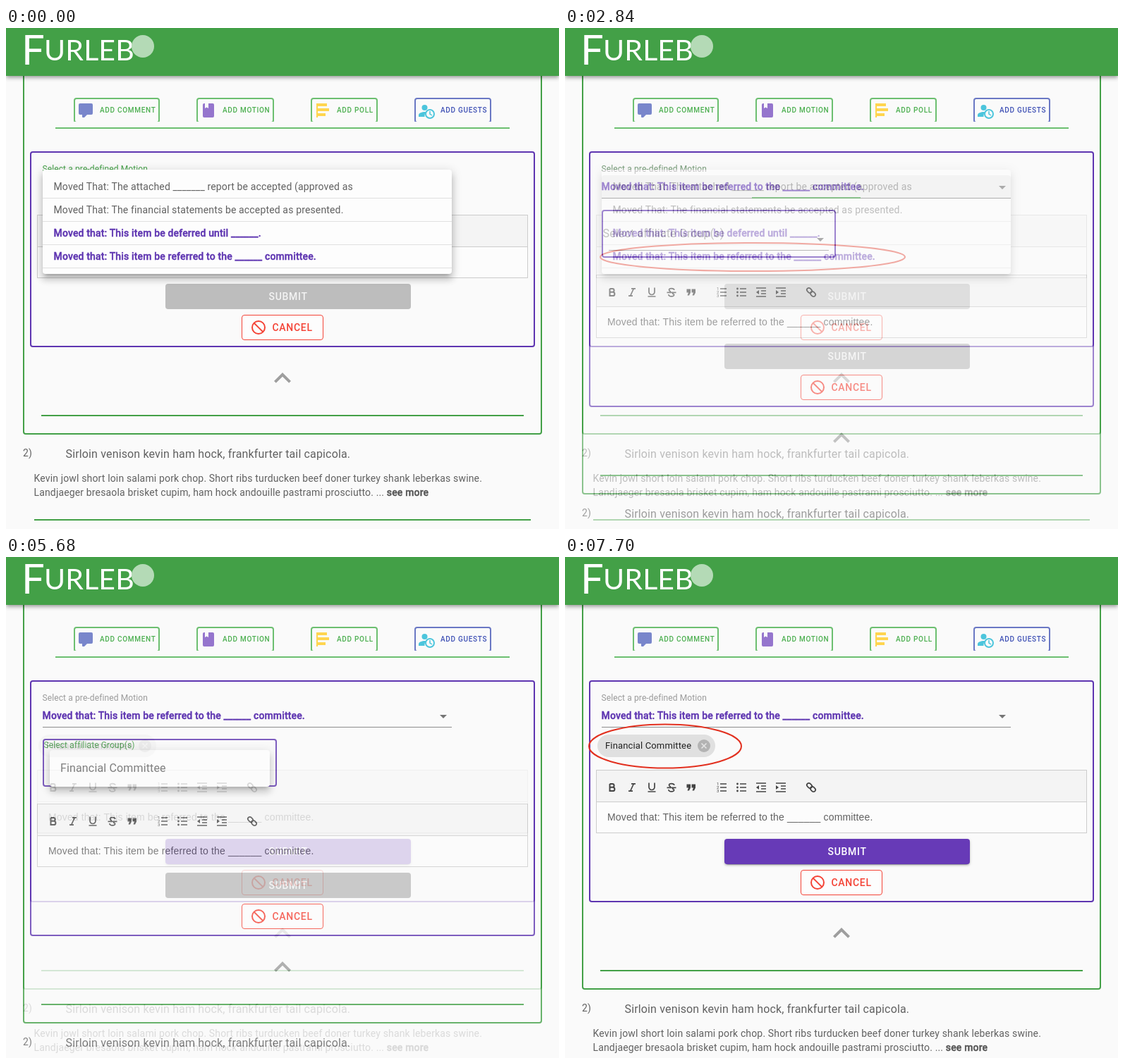
An HTML page that plays this animation: 784 px wide and 711 px high, repeating every 9.7 s.

```html
<!DOCTYPE html>
<html lang="en">
<head>
<meta charset="utf-8">
<title>Pre-defined motion form</title>
<style>
  html, body { margin: 0; width: 100%; height: 100%; overflow: hidden; background: #fafafa; }
  svg { display: block; width: 784px; height: 711px; }
  text { font: 14px Roboto, sans-serif; letter-spacing: .15px; fill: #616161; white-space: pre; }
  .bold { font-weight: 500; stroke: currentColor; stroke-width: .4px; fill: currentColor; }
  .button { font-weight: 500; letter-spacing: .7px; }
  .label { font-size: 12px; letter-spacing: .1125px; }
</style>
</head>
<body>
<svg id="stage" viewBox="0 0 784 711"></svg>
<script>
const GREEN = '#43a047', LIGHT_GREEN = '#6cbf70', PURPLE = '#5e35b1', RED = '#f44336', GRAY = '#9a9a9a', PAGE = '#fafafa';

const text = (x, y, s, attrs = '') => `<text x="${x}" y="${y}" ${attrs}>${s}</text>`;
const rect = (x, y, w, h, fill, r = 0, attrs = '') =>
  `<rect x="${x}" y="${y}" width="${w}" height="${h}" rx="${r}" fill="${fill}" ${attrs}/>`;
const frame = (x, y, w, h, color, width = 2, r = 3, fill = 'none') =>
  rect(x, y, w, h, fill, r, `stroke="${color}" stroke-width="${width}"`);
const path = (d, fill, attrs = '') => `<path d="${d}" fill="${fill}" ${attrs}/>`;
const line = (d, color, width = 2) => path(d, 'none', `stroke="${color}" stroke-width="${width}"`);
const circle = (x, y, r, fill, attrs = '') => `<circle cx="${x}" cy="${y}" r="${r}" fill="${fill}" ${attrs}/>`;
const group = (x, y, content, more = '') => `<g transform="translate(${x} ${y}) ${more}">${content}</g>`;
const ring = (x, y, rx, ry) =>
  `<ellipse cx="${x}" cy="${y}" rx="${rx}" ry="${ry}" fill="none" stroke="#e2301f" stroke-width="2"/>`;
const arrow = (x, y) => path(`M${x - 5} ${y}h10l-5 5z`, '#757575');

// Each shadow: [offset y, blur, spread, alpha]
const raised = (x, y, w, h, shadows, fill, r) => shadows.map(([dy, blur, spread, alpha]) =>
  rect(x - spread, y - spread + dy, w + 2 * spread, h + 2 * spread, '#000', r,
    `opacity="${alpha}" style="filter:blur(${blur / 2}px)"`)).join('') + rect(x, y, w, h, fill, r);
const MENU_SHADOW = [[5, 5, -3, .2], [8, 10, 1, .14], [3, 14, 2, .12]];
const BAR_SHADOW = [[2, 4, -1, .2], [4, 5, 0, .14], [1, 10, 0, .12]];
const BUTTON_SHADOW = [[3, 1, -2, .2], [2, 2, 0, .14], [1, 5, 0, .12]];

function header() {
  return raised(0, 0, 784, 68, BAR_SHADOW, GREEN, 0) +
    text(22, 52, 'F', 'style="font:58px Lato,sans-serif;fill:#fff"') +
    text(54, 46, 'URLEB', 'style="font:41px Lato,sans-serif;fill:#fff"') +
    circle(194, 26, 16, '#b4dab6');
}

function actions() {
  const button = (x, w, labelX, label, border, color) =>
    frame(x + 1, 100, w - 2, 34, border) + rect(x - 1, 133, w + 2, 4, PAGE) +
    text(labelX, 120, label, `class="button" style="font-size:10px;fill:${color}"`);
  const cyan = '#4cc5dc';
  return button(96, 122, 133, 'ADD COMMENT', LIGHT_GREEN, '#4caf50') +
    button(270, 110, 307, 'ADD MOTION', LIGHT_GREEN, '#4caf50') +
    button(432, 95, 469, 'ADD POLL', LIGHT_GREEN, '#4caf50') +
    button(579, 109, 616, 'ADD GUESTS', '#6a78c4', '#3f51b5') +
    path('M109 127a1 1 0 01-1-1v-3h-3a2 2 0 01-2-2v-12a2 2 0 012-2h16a2 2 0 012 2v12a2 2 0 01-2 2h-6l-4 4z', '#7986cb') +
    path('M293 127a2 2 0 002-2v-16a2 2 0 00-2-2h-6v7l-2.500-1.500-2.500 1.500v-7h-1a2 2 0 00-2 2v16a2 2 0 002 2z', '#9575cd') +
    path('M440 107h15v4h-13v3h16v4h-16v3h11v4h-11v2h-2z', '#ffd54f') +
    circle(593.5, 113, 4, cyan) +
    path('M585 126v-2.500c0-3 5-4.500 9-4.500l2 .2a8 8 0 00-2.500 6.800z', cyan) +
    circle(601, 122, 6, PAGE, `stroke="${cyan}" stroke-width="2"`) + line('M601 118v4l3 2', cyan, 1.5) +
    line('M70 142H714', LIGHT_GREEN);
}

function toolbarIcons() {
  const ink = '#444';
  const stroke = d => line(d, ink, 1.7);
  const rows = 'M-2-5h9M-2 0h9M-2 5h9', margins = 'M-7-6h14M0-2h7M0 2h7M-7 6h14';
  const digits = [1, 2, 3].map((n, i) => text(-7, i * 5 - 3, n, `style="font-size:6px;fill:${ink}"`)).join('');
  const link = '<g transform="rotate(45)">' + frame(-7.5, -2.8, 8, 5.6, ink, 1.7, 2.8) +
    frame(-.5, -2.8, 8, 5.6, ink, 1.7, 2.8) + '</g>';
  const icons = [
    [67, line('M-3.500-5v10h4.300a2.600 2.600 0 000-5.200h-4.300M.2-.2a2.400 2.400 0 000-4.800h-3.700', ink, 2)],
    [95, stroke('M-1-5.200h6M-5 5.200h6M2.300-5l-4.600 10')],
    [123, stroke('M-4-6.500v6a4 4 0 008 0v-6M-5.500 6h11')],
    [151, stroke('M-6.500.3h13M4-3.200c-.6-3-7.500-3-7.500 0q0 1.500 2.500 2.400M1 1.800c4 .8 3.200 4-1 4-2.500 0-4-1-4.300-2.700')],
    [179, path('M-6.500-4.500h5.500v5l-2 4h-2.500l1.500-4h-2.500zM.5-4.500h5.500v5l-2 4h-2.500l1.500-4h-2.500z', ink)],
    [222, stroke(rows) + digits],
    [250, stroke(rows) + [-5, 0, 5].map(y => circle(-5.5, y, 1.4, ink)).join('')],
    [278, stroke(margins) + path('M-7 0l4-3v6z', ink)],
    [306, stroke(margins) + path('M-3 0l-4-3v6z', ink)],
    [349, link]
  ];
  return icons.map(([x, icon]) => group(x, 290, icon)).join('');
}

function editor(filled) {
  return frame(44.5, 265.5, 695, 89, '#ccc', 1, 0, '#fcfcfc') +
    frame(44.5, 265.5, 695, 45, '#ccc', 1, 0, '#f4f4f4') + toolbarIcons() +
    (filled ? text(60, 337, 'Moved that: This item be referred to the ______ committee.',
      'style="font-family:Liberation Sans,Arial,sans-serif"') : '');
}

function formButtons(enabled) {
  return raised(226, 363, 348, 36, enabled ? BUTTON_SHADOW : [], enabled ? '#673ab7' : '#bdbdbd', 4) +
    text(372.5, 386, 'SUBMIT', `class="button" style="fill:${enabled ? '#fff' : '#f3f3f3'}"`) +
    frame(334.5, 407.5, 115, 35, RED, 1, 3.5, '#fdfdfd') +
    circle(358, 425, 9, 'none', `stroke="${RED}" stroke-width="2"`) + line('M351.600 418.600l12.800 12.800', RED) +
    text(377.5, 430, 'CANCEL', `class="button" style="fill:${RED}"`);
}

function agenda() {
  return path('M12 8l-6 6 1.410 1.410L12 10.830l4.590 4.580L18 14z', '#9e9e9e', 'transform="translate(368 473) scale(2)"') +
    line('M50 550H734M40 698H744', GREEN) +
    text(24, 608, '2)') +
    text(84.5, 610, 'Sirloin venison kevin ham hock, frankfurter tail capicola.', 'style="font-size:16px"') +
    text(39.5, 644, 'Kevin jowl short loin salami pork chop. Short ribs turducken beef doner turkey shank leberkas swine.') +
    text(39.5, 664, 'Landjaeger bresaola brisket cupim, ham hock andouille pastrami prosciutto. ... ' +
      '<tspan class="bold" style="color:#555">see more</tspan>');
}

const motionLabel = color => text(51.5, 204, 'Select a pre-defined Motion', `class="label" style="fill:${color}"`);

function motionMenu() {
  const items = ['Moved That: The attached _______ report be accepted (approved as',
    'Moved That: The financial statements be accepted as presented.',
    'Moved that: This item be deferred until ______.',
    'Moved that: This item be referred to the ______ committee.'];
  return motionLabel(GREEN) + raised(52, 201, 580, 148, MENU_SHADOW, '#fdfdfd', 4) +
    items.map((item, i) => text(67.5, 230 + 33 * i, item, i > 1 ? `class="bold" style="color:${PURPLE}"` : '') +
      line(`M52 ${241.5 + 33 * i}H632`, '#e0e0e0', 1)).join('');
}

function motionField(focused) {
  return (focused ? path('M52 241v-28q0-4 4-4h572q4 0 4 4v28z', '#eee') : '') +
    motionLabel(GRAY) +
    text(51.5, 230, 'Moved that: This item be referred to the ______ committee.', `class="bold" style="color:${PURPLE}"`) +
    line('M52 241.500H632', '#8c8c8c', 1) + (focused ? line('M265 241H419', GREEN) : '') + arrow(620, 224);
}

function groupField(open) {
  return frame(53, 259, 330, 66, PURPLE) + (open
    ? text(53.5, 271, 'Select affiliate Group(s)', `class="label" style="fill:${GREEN}"`) +
      raised(62, 274, 312, 52, MENU_SHADOW, '#fdfdfd', 4) +
      text(77, 305, 'Financial Committee', 'style="font-size:16px"')
    : text(53.5, 297, 'Select affiliate Group(s)', `style="font-size:16px;fill:${GRAY}"`) +
      line('M62 315.500H374', '#8c8c8c', 1) + arrow(362, 298));
}

function chip() {
  return rect(46, 252, 167, 32, '#e0e0e0', 16) +
    text(57, 272, 'Financial Committee', 'style="font-size:13px;fill:#212121"') +
    circle(197, 268, 9, '#b3b3b3') + line('M193.500 264.500l7 7m0-7l-7 7', '#e4e4e4', 1.7);
}

// shift moves everything below the fields
function scene({ shift, filled, enabled, fields }) {
  return rect(0, 0, 784, 711, PAGE) +
    frame(25, 40, 734, 536 + shift, GREEN) + actions() +
    frame(35, 176, 714, 276 + shift, PURPLE) +
    group(0, shift, editor(filled) + formButtons(enabled) + agenda()) +
    fields + header();
}

const choosing = { shift: 0 };
const grouping = { shift: 85, filled: true };
const ready = { shift: 37, filled: true, enabled: true };
const scenes = [
  { ...choosing, fields: motionMenu() },
  { ...choosing, fields: motionMenu() + ring(266, 325, 216, 20) },
  { ...grouping, fields: motionField(true) + groupField(false) },
  { ...grouping, fields: motionField(false) + groupField(true) },
  { ...ready, fields: motionField(false) + chip() },
  { ...ready, fields: motionField(false) + chip() + ring(142, 268.5, 108, 31) }
];

const stage = document.getElementById('stage');
stage.innerHTML = scenes.map(s => `<g>${scene(s)}</g>`).join('');
const layers = [...stage.children];

const LOOP = 9700, HOLD = 1000, PERIOD = 1540, STEP = 60, STEPS = 10;

function draw(now) {
  const t = now % LOOP - HOLD;
  const current = Math.max(0, Math.min(scenes.length - 2, Math.floor(t / PERIOD)));
  const mix = t < 0 ? 0 : Math.min(1, (Math.floor((t - current * PERIOD) / STEP) + 1) / STEPS);
  layers.forEach((layer, i) => {
    const opacity = i === current ? 1 : i === current + 1 ? mix : 0;
    layer.style.display = opacity ? '' : 'none';
    layer.style.opacity = opacity;
  });
}

function tick() {
  draw(performance.now());
  requestAnimationFrame(tick);
}
tick();
</script>
</body>
</html>
```
